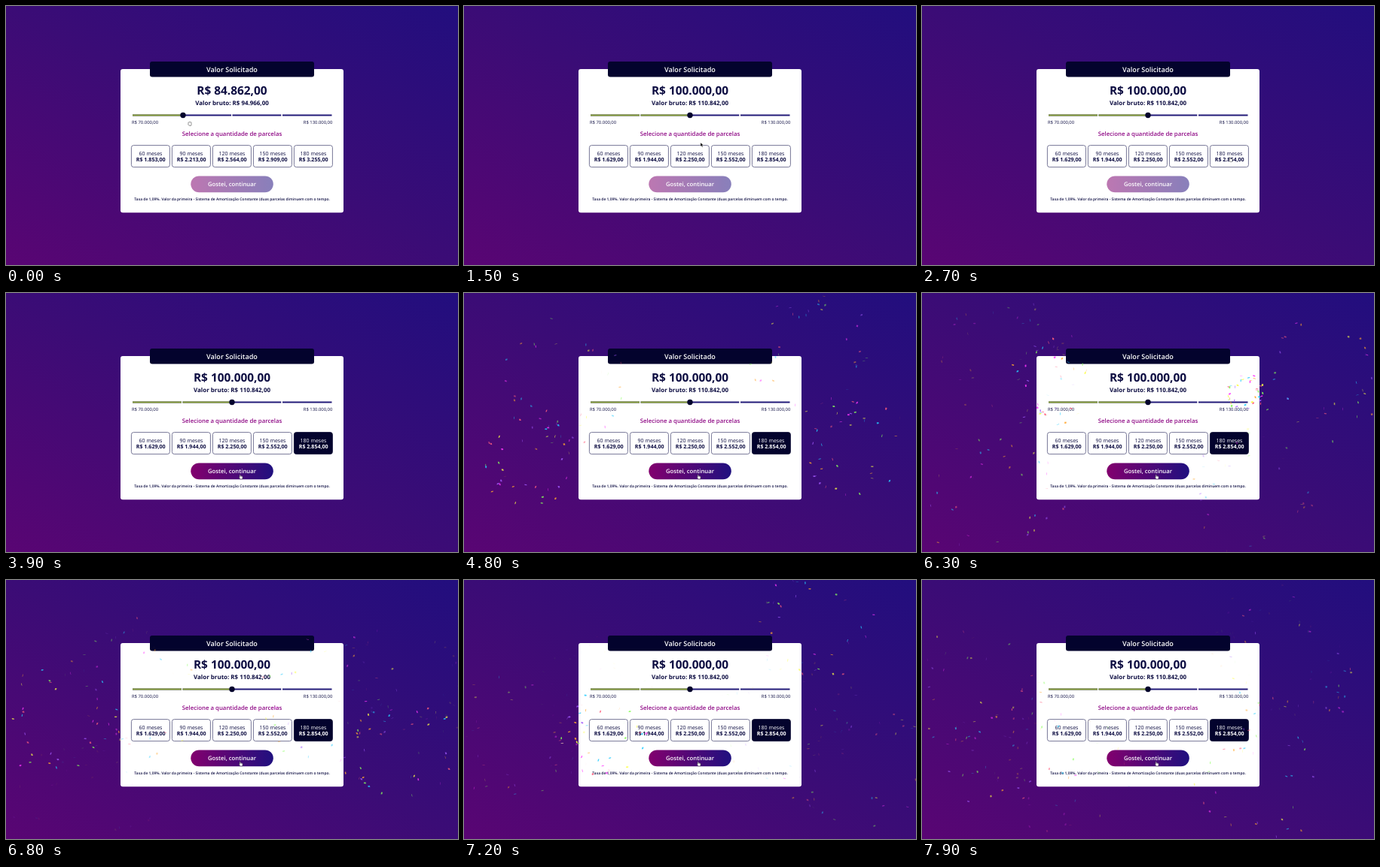
Recreate the animation shown at these times as an HTML page with a canvas. Size 600x345 px, loop 8000 ms.

```html
<!DOCTYPE html>
<html lang="pt-BR">
<head>
<meta charset="utf-8">
<title>Simulador</title>
<style>
  html, body { margin: 0; width: 100%; height: 100%; overflow: hidden; }
  body { position: relative; background: linear-gradient(to top right, #590573, #3b0c76 50%, #220e7e); }
  svg, canvas { position: absolute; left: 0; top: 0; width: 600px; height: 345px; display: block; }
  text { font-family: "Open Sans", "Noto Sans", sans-serif; text-anchor: middle; fill: #0d0d42; text-rendering: geometricPrecision; }
  .semi { font-weight: 600; }
  .bold { font-weight: 700; }
  .light { fill: #fff; }
  .small { font-size: 5.9px; }
  .option rect { fill: #fff; stroke: #55557d; stroke-width: .8; }
  .month { font-size: 7px; }
  .rate { font-size: 7.1px; font-weight: 700; }

  .pick rect { animation: pick-box 8s infinite; }
  .pick text { animation: pick-text 8s infinite; }
  #button { animation: enable 8s infinite; }
  #cursor { animation: travel 8s infinite ease-in-out; }
  #fist { animation: fist 8s infinite step-end; }
  #arrow { animation: arrow 8s infinite step-end; }
  #hand { animation: hand 8s infinite step-end; }

  @keyframes pick-box {
    0%, 36.5% { fill: #fff; stroke: #55557d; }
    38%, 100% { fill: #03032d; stroke: #03032d; }
  }
  @keyframes pick-text {
    0%, 36.5% { fill: #0d0d42; }
    38%, 100% { fill: #fff; }
  }
  @keyframes enable {
    0%, 36.5% { opacity: .53; }
    38%, 100% { opacity: 1; }
  }
  @keyframes travel {
    0%, 1.25% { transform: translate(241.5px, 154px); }
    10.6%, 14% { transform: translate(306.5px, 154px); }
    18.75% { transform: translate(314px, 182px); }
    31%, 37.5% { transform: translate(407px, 201px); }
    46%, 100% { transform: translate(309px, 241.5px); }
  }
  @keyframes fist { 0% { opacity: 1; } 12%, 100% { opacity: 0; } }
  @keyframes arrow { 0% { opacity: 0; } 12% { opacity: 1; } 20%, 100% { opacity: 0; } }
  @keyframes hand { 0% { opacity: 0; } 20%, 100% { opacity: 1; } }
</style>
</head>
<body>
<svg viewBox="0 0 600 345">
  <defs>
    <linearGradient id="cta">
      <stop offset="0" stop-color="#82006e"/>
      <stop offset="1" stop-color="#20107f"/>
    </linearGradient>
  </defs>
  <rect x="152" y="84" width="296" height="191.3" rx="3" fill="#fff"/>
  <rect x="191" y="74" width="218" height="20.5" rx="3" fill="#03032d"/>
  <text class="semi light" x="300" y="87.8" font-size="9.1">Valor Solicitado</text>
  <text class="bold" id="net" x="300" y="118" font-size="15.4"></text>
  <text class="bold" id="gross" x="300" y="131.8" font-size="7.95"></text>

  <g id="track" stroke-width="2"></g>
  <circle id="knob" cy="145.5" r="3.7" fill="#03032d"/>
  <text class="small" x="184.5" y="157.2">R$ 70.000,00</text>
  <text class="small" x="414" y="157.2">R$ 130.000,00</text>

  <text class="semi" x="300" y="173.2" font-size="7.82" style="fill:#8f0a86">Selecione a quantidade de parcelas</text>
  <g id="options"></g>

  <rect id="button" x="245.3" y="226.4" width="109.5" height="21.8" rx="10.9" fill="url(#cta)"/>
  <text class="semi light" x="300" y="240.3" font-size="7.72">Gostei, continuar</text>
  <text class="semi" x="300" y="258.8" font-size="4.95">Taxa de 1,09%. Valor da primeira - Sistema de Amortização Constante (duas parcelas diminuem com o tempo.</text>
</svg>
<canvas id="confetti"></canvas>
<svg viewBox="0 0 600 345">
  <g id="cursor" stroke-width=".6" stroke-linejoin="round">
    <path id="fist" d="M.6 2.6V1.2Q1.3 .2 2 .9Q2.7 0 3.3 .8Q4.3 .3 4.6 1.4V3.8Q4.4 5.6 2.8 5.7Q1.4 5.6 .2 3.2Z" fill="#fff" stroke="#333"/>
    <path id="arrow" d="M0 0V5L1.2 4L2.1 6L3 5.6L2.1 3.7L3.7 3.5Z" fill="#000" stroke="#fff" stroke-width=".3"/>
    <path id="hand" d="M1.2 3.4V.8Q1.7 0 2.2 .8V2.4Q3 2 3.5 2.6Q4.3 2.3 4.5 2.9Q5.2 2.8 5.2 3.6Q5.2 5.6 4.4 6.6H2.1Q1 5.2 .2 4Q.4 3 1.2 3.8Z" fill="#fff" stroke="#222" stroke-width=".45"/>
  </g>
</svg>
<script>
const LOOP = 8000;
const SVG_NS = "http://www.w3.org/2000/svg";
const byId = id => document.getElementById(id);

function add(parent, tag, attrs, text = "") {
  const el = document.createElementNS(SVG_NS, tag);
  for (const key in attrs) el.setAttribute(key, attrs[key]);
  el.textContent = text;
  return parent.appendChild(el);
}

const mix = (a, b, k) => a + (b - a) * k;
const money = n => "R$ " + String(Math.round(n)).replace(/\B(?=(\d{3})+$)/g, ".") + ",00";

// Slider: four segments, each with a filled overlay
const segments = [168, 234.5, 300.5, 367].map((x, i) => {
  const end = [233, 299, 365.3, 432.5][i];
  const line = color => add(byId("track"), "line", { x1: x, x2: end, y1: 145.5, y2: 145.5, stroke: color });
  line("#221a78");
  return { x, end, fill: line("#8ea63c") };
});

const plans = [
  [60, 1853, 1629], [90, 2213, 1944], [120, 2564, 2250], [150, 2909, 2552], [180, 3255, 2854]
].map(([months, from, to], i) => {
  const x = 166.4 + i * 54;
  const group = add(byId("options"), "g", { class: months === 180 ? "option pick" : "option" });
  add(group, "rect", { x, y: 185.6, width: 51, height: 29, rx: 3 });
  add(group, "text", { class: "month", x: x + 25.6, y: 198.6 }, months + " meses");
  const label = add(group, "text", { class: "rate", x: x + 25.8, y: 207.4 });
  return { from, to, label };
});

function drawForm(t) {
  const p = Math.min(1, Math.max(0, (t - 100) / 750));
  const k = p * p * (3 - 2 * p);
  const knobX = mix(235, 300, k);
  byId("knob").setAttribute("cx", knobX);
  for (const s of segments) {
    s.fill.setAttribute("x2", Math.max(s.x, Math.min(s.end, knobX)));
  }
  byId("net").textContent = money(mix(84862, 100000, k));
  byId("gross").textContent = "Valor bruto: " + money(mix(94966, 110842, k));
  for (const plan of plans) plan.label.textContent = money(mix(plan.from, plan.to, k));
}

// Confetti
const COLORS = ["#26ccff", "#a25afd", "#ff5e7e", "#88ff5a", "#fcff42", "#ffa62d", "#ff36ff"];
const SCALE = .325;
const LIFE = 66;
const TICK = 1000 / 60;

// start time, x, y
const bursts = [
  [4250, 130, 90], [4250, 470, 60], [4600, 90, 210], [4600, 520, 190],
  [4850, 160, 50], [4880, 500, 250], [5200, 82, 122], [5150, 530, -20],
  [5500, 120, 40], [5600, 440, 230], [5780, 100, 250], [5850, 530, 80],
  [6150, 170, 110], [6250, 430, 130], [6500, 70, 170], [6550, 520, 210],
  [6880, 465, 38], [7050, 184, 198], [7250, 70, 120], [7300, 490, 80],
  [7450, 440, 250], [7480, 120, 200]
];

function randomFrom(seed) {
  return () => {
    seed = (seed + 0x6D2B79F5) | 0;
    let n = Math.imul(seed ^ (seed >>> 15), 1 | seed);
    n = (n + Math.imul(n ^ (n >>> 7), 61 | n)) ^ n;
    return ((n ^ (n >>> 14)) >>> 0) / 4294967296;
  };
}

const rand = randomFrom(27);
const pieces = bursts.flatMap(([start, x, y]) => Array.from({ length: 36 }, (_, i) => ({
  start, x, y,
  angle: rand() * Math.PI * 2,
  speed: 15 + rand() * 15,
  wobble: rand() * 10,
  wobbleSpeed: Math.min(.11, rand() * .1 + .05),
  tilt: (rand() * .5 + .25) * Math.PI,
  size: 2 + rand(),
  color: COLORS[i % COLORS.length]
})));

const canvas = byId("confetti");
const ratio = window.devicePixelRatio || 1;
canvas.width = 600 * ratio;
canvas.height = 345 * ratio;
const ctx = canvas.getContext("2d");

function drawPiece(p, n) {
  const dist = p.speed * (1 - Math.pow(.9, n)) / .1;
  const wobble = p.wobble + p.wobbleSpeed * n;
  const tilt = p.tilt + .1 * n;
  const wx = 10 * Math.cos(wobble), wy = 10 * Math.sin(wobble);
  const tx = p.size * Math.cos(tilt), ty = p.size * Math.sin(tilt);
  ctx.save();
  ctx.translate(p.x + Math.cos(p.angle) * dist * SCALE, p.y + (Math.sin(p.angle) * dist + 3 * n) * SCALE);
  ctx.scale(SCALE, SCALE);
  ctx.globalAlpha = 1 - n / LIFE;
  ctx.fillStyle = p.color;
  ctx.beginPath();
  ctx.moveTo(0, 0);
  ctx.lineTo(wx, ty);
  ctx.lineTo(wx + tx, wy + ty);
  ctx.lineTo(tx, wy);
  ctx.fill();
  ctx.restore();
}

function drawConfetti(t) {
  ctx.setTransform(ratio, 0, 0, ratio, 0, 0);
  ctx.clearRect(0, 0, 600, 345);
  for (const p of pieces) {
    const n = (t - p.start) / TICK;
    if (n > 0 && n < LIFE) drawPiece(p, n);
  }
}

let origin;
function frame(now) {
  origin ??= now;
  const t = (now - origin) % LOOP;
  drawForm(t);
  drawConfetti(t);
  requestAnimationFrame(frame);
}
drawForm(0);
requestAnimationFrame(frame);
</script>
</body>
</html>
```
